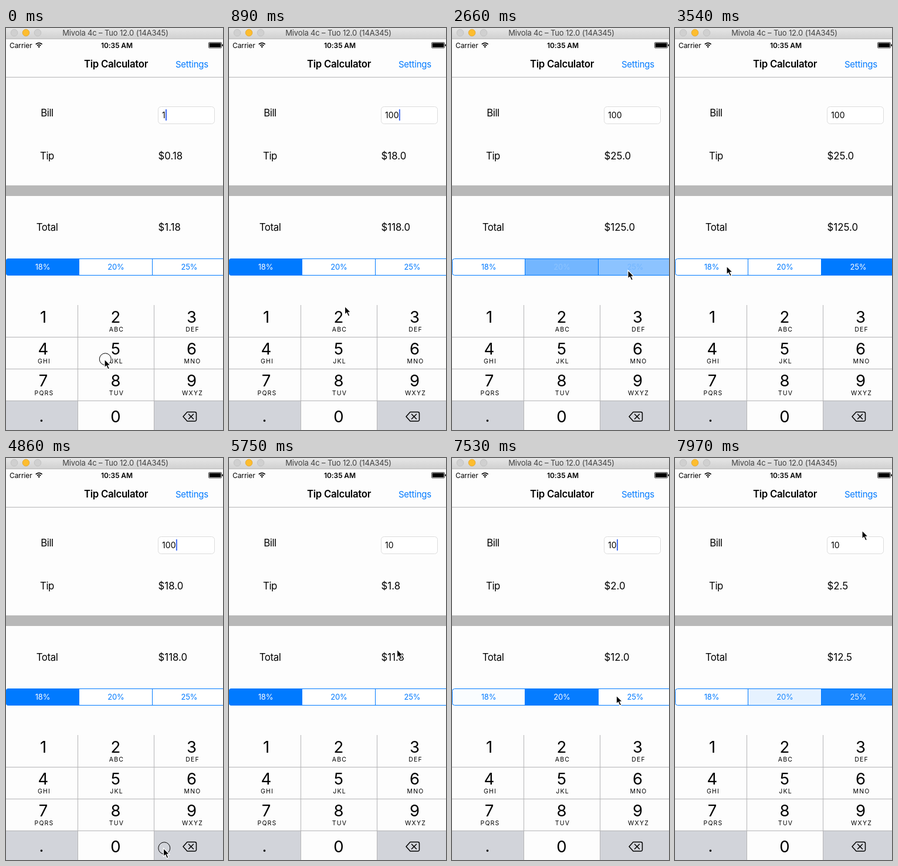
These frames come from a looping animation (370 by 682 pixels, 8 s). An HTML page:

```html
<!DOCTYPE html>
<html lang="en">
<head>
<meta charset="utf-8">
<title>Tip Calculator</title>
<style>
  html, body { margin: 0; width: 100%; height: 100%; overflow: hidden; background: #fdfdfd; }
  svg { display: block; width: 370px; height: 682px; font-family: Inter, "Liberation Sans", sans-serif; }
  .mid { text-anchor: middle; }
  .label { font-size: 16.8px; letter-spacing: -.4px; }
  .value { font-size: 16.8px; letter-spacing: .05px; }
  .seg { font-size: 13px; letter-spacing: -.2px; }
  .digit { font-size: 27.5px; }
  .letters { font-size: 10.5px; letter-spacing: 1.2px; }
  .rule { stroke: #b4b4b6; }
  .blue { fill: #007aff; }
  .line { fill: none; stroke: #000; }
</style>
</head>
<body>
<svg viewBox="0 0 370 682">
  <defs>
    <linearGradient id="bar" x2="0" y2="1">
      <stop stop-color="#e6e6e6"/><stop offset="1" stop-color="#d1d1d1"/>
    </linearGradient>
    <clipPath id="round"><rect y="391" width="376" height="29" rx="4"/></clipPath>
  </defs>
  <rect width="370" height="682" fill="#fdfdfd"/>

  <!-- window bar -->
  <rect width="370" height="18" fill="url(#bar)"/>
  <path d="M0 18.5H370" stroke="#b9b9b9"/>
  <g stroke-width=".8">
    <circle cx="14" cy="8" r="5.8" fill="#d0d0d0" stroke="#bdbdbd"/>
    <circle cx="34" cy="8" r="5.8" fill="#fdbd2f" stroke="#e0a126"/>
    <circle cx="54" cy="8" r="5.8" fill="#d0d0d0" stroke="#bdbdbd"/>
  </g>
  <text class="mid" x="186.5" y="13" font-size="13" letter-spacing="-.15" fill="#404040">Mivola 4c – Tuo 12.0 (14A345)</text>

  <!-- status bar -->
  <text x="6" y="33.5" font-size="12" letter-spacing="-.1">Carrier</text>
  <g class="line" stroke-width="1.7">
    <path d="M50.8 27.6a7.6 7.6 0 0 1 10.8 0M53 30a4.5 4.5 0 0 1 6.4 0"/>
  </g>
  <path d="M54.4 31.6a2.5 2.5 0 0 1 3.6 0L56.2 33.7Z"/>
  <text class="mid" x="189" y="33.5" font-size="12" font-weight="600" letter-spacing="-.1">10:35 AM</text>
  <rect class="line" x="345.4" y="24.4" width="22.2" height="9.6" rx="1.6" stroke-width=".7"/>
  <rect x="346.6" y="25.6" width="19.8" height="7.2" rx=".6"/>
  <rect x="368.5" y="27.5" width="1.5" height="3.5" rx=".7"/>

  <!-- navigation -->
  <text class="mid" x="187.5" y="67" font-size="16.8" font-weight="600" letter-spacing="-.3">Tip Calculator</text>
  <text class="mid blue" x="317" y="66.5" font-size="15" letter-spacing="-.2">Settings</text>
  <path class="rule" d="M0 83.5H370"/>

  <!-- form -->
  <g class="label mid">
    <text x="70" y="150">Bill</text>
    <text x="70" y="223">Tip</text>
    <text x="70" y="344">Total</text>
  </g>
  <text id="tip" class="value" x="259.5" y="223"></text>
  <text id="total" class="value" x="259.5" y="344"></text>
  <rect x="259.5" y="133.5" width="96" height="29" rx="5" fill="#fff" stroke="#dcdcdc"/>
  <text id="bill" x="266" y="153" font-size="14" letter-spacing=".1"></text>
  <rect id="caret" y="138" width="2" height="19" fill="#426bf2"/>
  <rect y="267" width="370" height="18" fill="#b8b8b8"/>

  <g id="segments" clip-path="url(#round)"></g>
  <path fill="none" stroke="#007aff" d="M376 391.5H4.5a4 4 0 0 0-4 4V415.5a4 4 0 0 0 4 4H376M124.5 391V420M249.5 391V420"/>
  <g id="names"></g>

  <!-- keypad -->
  <rect y="632" width="122" height="50" fill="#d2d4da"/>
  <rect id="zero" x="123" y="632" width="130" height="50"/>
  <rect id="del" x="253" y="632" width="117" height="50"/>
  <path class="rule" d="M122.5 470V682M252.5 470V682M0 524.5H370M0 578.5H370M0 632.5H370"/>
  <g id="keys"></g>
  <g class="line" stroke-width="1.5" stroke-linejoin="round" stroke-linecap="round">
    <path d="M309 651.5H322a2.5 2.5 0 0 1 2.5 2.5V664.5a2.5 2.5 0 0 1-2.5 2.5H309L302 659.2Z"/>
    <path d="M311.5 655.2l8 8m0-8l-8 8"/>
  </g>

  <g id="pointer">
    <circle id="ring" class="line" cx="1.3" cy="-.2" r="10"/>
    <path d="M0 0V14.2L3.2 11.3 5.8 17 8.4 15.8 5.9 10.3H10.2Z" stroke="#fff" stroke-width="1.2"/>
  </g>
</svg>
<script>
const LOOP = 8000, STEP = 147.6, LEAD = 11, LAST = 54;  // ms, ms per tick, ms, tick
const BLINK = 7.1, BLINK_ON = 4.85;                     // ticks
const RATES = [18, 20, 25];
const $ = id => document.getElementById(id);

function add(parent, tag, attrs, text = '') {
  const el = document.createElementNS('http://www.w3.org/2000/svg', tag);
  for (const name in attrs) el.setAttribute(name, attrs[name]);
  el.textContent = text;
  return $(parent).appendChild(el);
}

const fills = RATES.map((_, i) =>
  add('segments', 'rect', { x: i * 125, y: 391, width: 125, height: 29 }));
const names = RATES.map((rate, i) =>
  add('names', 'text', { class: 'mid seg', x: 62.5 + 125 * i, y: 410 }, rate + '%'));

const COLUMNS = [63.5, 187, 316.5];
['', 'ABC', 'DEF', 'GHI', 'JKL', 'MNO', 'PQRS', 'TUV', 'WXYZ'].forEach((word, i) => {
  const x = COLUMNS[i % 3], y = 500 + 54 * Math.floor(i / 3);
  add('keys', 'text', { class: 'mid digit', x, y }, i + 1);
  add('keys', 'text', { class: 'mid letters', x: x + 1.5, y: y + 15 }, word);
});
add('keys', 'text', { class: 'mid digit', x: 187, y: 669 }, '0');
add('keys', 'text', { class: 'mid digit', x: 60.5, y: 668 }, '.');

const HOME = { x: 168, y: 562 };
const MOVES = [
  { start: 0, end: 2, x: 187, y: 655 },     // zero key
  { start: 4, end: 8, x: 201, y: 411 },     // 20%
  { start: 13, end: 16, x: 300, y: 411 },   // 25%
  { start: 19, end: 23, x: 88, y: 404 },    // 18%
  { start: 28, end: 33, x: 268.5, y: 662 }, // delete key
  { start: 37, end: 43, x: 301, y: 55 },    // settings
  { start: 44, end: 47, x: 280.5, y: 337 }, // total
  { start: 47, end: 48, x: 215, y: 403 },   // 20%
  { start: 50, end: 52, x: 302, y: 403 },   // 25%
  { start: 53, end: 54, x: 319, y: 123 }    // bill
];
// each click takes effect one tick later
const CLICKS = [
  { at: 0, type: '' }, { at: 2, type: '0' }, { at: 4, type: '0' },
  { at: 10, pick: 1 }, { at: 17, pick: 2 }, { at: 26, pick: 0 },
  { at: 33, erase: true }, { at: 48, pick: 1 }, { at: 52, pick: 2 }
];

const money = v => '$' + (Number.isInteger(v) ? v.toFixed(1) : v);
const mix = (a, b, k) => a + (b - a) * k;
const blueToWhite = k => `rgb(${mix(0, 255, k)},${mix(122, 255, k)},255)`;

function pointerAt(n) {
  let { x, y } = HOME;
  for (const move of MOVES) {
    const p = Math.min(1, Math.max(0, (n - move.start) / (move.end - move.start)));
    const k = 1 - (1 - p) ** 2;
    x = mix(x, move.x, k);
    y = mix(y, move.y, k);
  }
  return [x, y];
}

function stateAt(n) {
  const s = { bill: '1', from: 1, to: 0, pickedAt: -LAST, editedAt: 0, ring: false, lit: '' };
  for (const { at, type, pick, erase } of CLICKS) {
    if (at > n) break;
    s.ring = at === n;
    if (pick === undefined) s.editedAt = at;
    if (at === n) break;
    if (pick !== undefined) [s.from, s.to, s.pickedAt] = [s.to, pick, at + 1];
    else s.bill = erase ? s.bill.slice(0, -1) : s.bill + type;
    s.lit = n > at + 1 ? '' : erase ? 'del' : type ? 'zero' : '';
  }
  return s;
}

function draw(n) {
  const s = stateAt(n);

  const fade = .55 * .18 ** (n - s.pickedAt);
  RATES.forEach((_, i) => {
    const level = i === s.to ? 1 - fade : i === s.from ? fade : 0;
    fills[i].setAttribute('fill', blueToWhite(1 - level));
    names[i].setAttribute('fill', blueToWhite(level));
  });

  const cents = s.bill * RATES[s.to];
  $('bill').textContent = s.bill;
  $('tip').textContent = money(cents / 100);
  $('total').textContent = money((s.bill * 100 + cents) / 100);
  $('caret').setAttribute('x', 266.2 + $('bill').getComputedTextLength());
  $('caret').style.opacity = (n - s.editedAt) % BLINK < BLINK_ON ? 1 : 0;

  $('zero').setAttribute('fill', s.lit === 'zero' ? '#d2d4da' : '#fdfdfd');
  $('del').setAttribute('fill', s.lit === 'del' ? '#fdfdfd' : '#d2d4da');
  $('ring').style.opacity = s.ring ? 1 : 0;
  $('pointer').setAttribute('transform', `translate(${pointerAt(n)})`);
}

let shown = -1;
const origin = performance.now();
function tick() {
  const t = (performance.now() - origin) % LOOP;
  const n = Math.min(LAST, Math.floor((t + LEAD) / STEP));
  if (n !== shown) draw(shown = n);
  requestAnimationFrame(tick);
}
tick();
</script>
</body>
</html>
```
